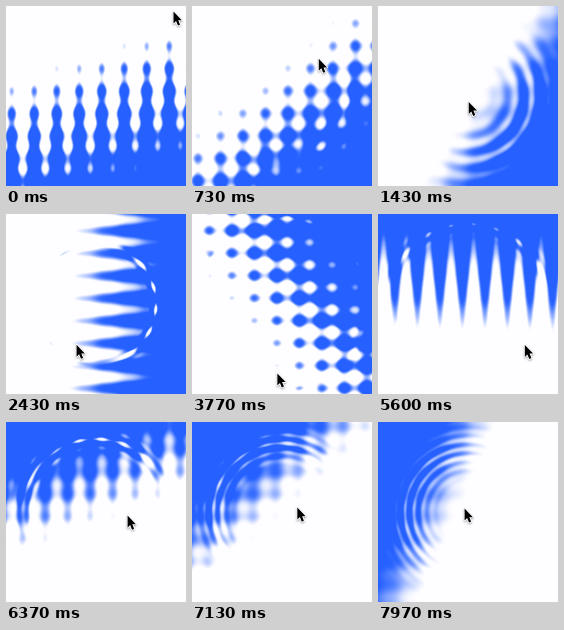
Animation of 180 by 180 pixels, one loop 8 s. Source, as an HTML page with a canvas:

```html
<!DOCTYPE html>
<html lang="en">
<head>
<meta charset="utf-8">
<title>Rippling gradient</title>
<style>
  html, body { margin: 0; width: 100%; height: 100%; overflow: hidden; background: #fefdff; }
  canvas { display: block; width: 100vw; height: 100vh; }
</style>
</head>
<body>
<canvas id="stage" width="180" height="180"></canvas>
<script>
const SIZE = 180, MID = SIZE / 2, LOOP = 8000, STEP = 1000 / 30;
const WAVE = 2 * Math.PI / 22.5;
const PAPER = [254, 253, 255], BLUE = [38, 97, 255];

const ctx = document.getElementById('stage').getContext('2d');
const image = ctx.createImageData(SIZE, SIZE);

// Pose over time: pointer tip, edge offset, and the circular ripple.
const times = [0, 1430, 2430, 3770, 4770, 6370, 7970];
const pose = {
  x: [167, 89, 70, 85, 159, 121, 86],
  y: [5, 97, 131, 159, 171, 93, 86],
  edge: [21, 33, 18, 17, 15, 29, 34],
  radius: [64, 64, 60, 86, 88, 73, 63],
  width: [12, 26, 5, 8, 6, 9, 20],
  push: [0, 32, 40, 18, 0, 38, 24],
  gap: [17, 17, 9, 10, 10, 9, 9]
};

function segment(t) {
  let i = 0;
  while (i < times.length - 2 && t > times[i + 1]) i++;
  return i;
}

function slope(v, i) {
  const a = Math.max(i - 1, 0), b = Math.min(i + 1, times.length - 1);
  return (v[b] - v[a]) / (times[b] - times[a]);
}

function spline(v, t) {
  const i = segment(t), h = times[i + 1] - times[i];
  const u = Math.min((t - times[i]) / h, 1), u2 = u * u, u3 = u2 * u;
  return v[i] * (2 * u3 - 3 * u2 + 1) + v[i + 1] * (3 * u2 - 2 * u3)
    + h * (slope(v, i) * (u3 - 2 * u2 + u) + slope(v, i + 1) * (u3 - u2));
}

function ease(v, t) {
  const i = segment(t);
  const u = Math.min((t - times[i]) / (times[i + 1] - times[i]), 1);
  return v[i] + (v[i + 1] - v[i]) * u * u * (3 - 2 * u);
}

// The pointer's distance from the middle drives the warp; near it the edge softens.
function drawField(t, px, py) {
  const angle = 1.25 - t / 2000;
  const nx = Math.cos(angle), ny = Math.sin(angle);
  const stir = Math.tanh(Math.hypot(px - MID, py - MID) / 70);
  const amp = 45 * stir, soft = 24 - 10 * stir;
  const edge = ease(pose.edge, t), radius = ease(pose.radius, t);
  const width = ease(pose.width, t), push = ease(pose.push, t);
  const ring = 2 * Math.PI / ease(pose.gap, t);
  const data = image.data;
  let k = 0;

  for (let y = 0; y < SIZE; y++) {
    const v = y + 0.5 - MID, sv = amp * Math.sin(WAVE * v);
    for (let x = 0; x < SIZE; x++) {
      const u = x + 0.5 - MID;
      const r = Math.hypot(u, v), d = r - radius;
      const ripple = push * Math.exp(-(d * d) / (width * width)) * Math.cos(ring * d);
      const pull = 1 - ripple / (r + 6);
      const f = nx * (u * pull - sv) + ny * (v * pull + amp * Math.sin(WAVE * u)) - edge;
      const s = Math.min(Math.max((f + soft) / (2 * soft), 0), 1);
      const mix = s * s * (3 - 2 * s);
      for (let c = 0; c < 3; c++) data[k++] = PAPER[c] + (BLUE[c] - PAPER[c]) * mix;
      data[k++] = 255;
    }
  }
  ctx.putImageData(image, 0, 0);
}

const arrow = new Path2D('M0 0V14.2L3.2 11.2L5.6 16.6L8.2 15.5L5.9 10.2H10.4Z');

function drawPointer(x, y) {
  ctx.save();
  ctx.translate(x + 0.5, y + 0.5);
  ctx.scale(0.8, 0.85);
  ctx.lineJoin = 'round';
  ctx.lineWidth = 2;
  ctx.strokeStyle = '#fff';
  ctx.shadowColor = 'rgba(0,0,0,.35)';
  ctx.shadowBlur = 2;
  ctx.shadowOffsetY = 1;
  ctx.stroke(arrow);
  ctx.shadowColor = 'transparent';
  ctx.fillStyle = '#000';
  ctx.fill(arrow);
  ctx.restore();
}

const start = performance.now();

function frame() {
  const now = (performance.now() - start) % LOOP;
  const t = Math.floor(now / STEP) * STEP;
  const x = spline(pose.x, t), y = spline(pose.y, t);
  drawField(t, x, y);
  drawPointer(x, y);
  requestAnimationFrame(frame);
}
frame();
</script>
</body>
</html>
```
